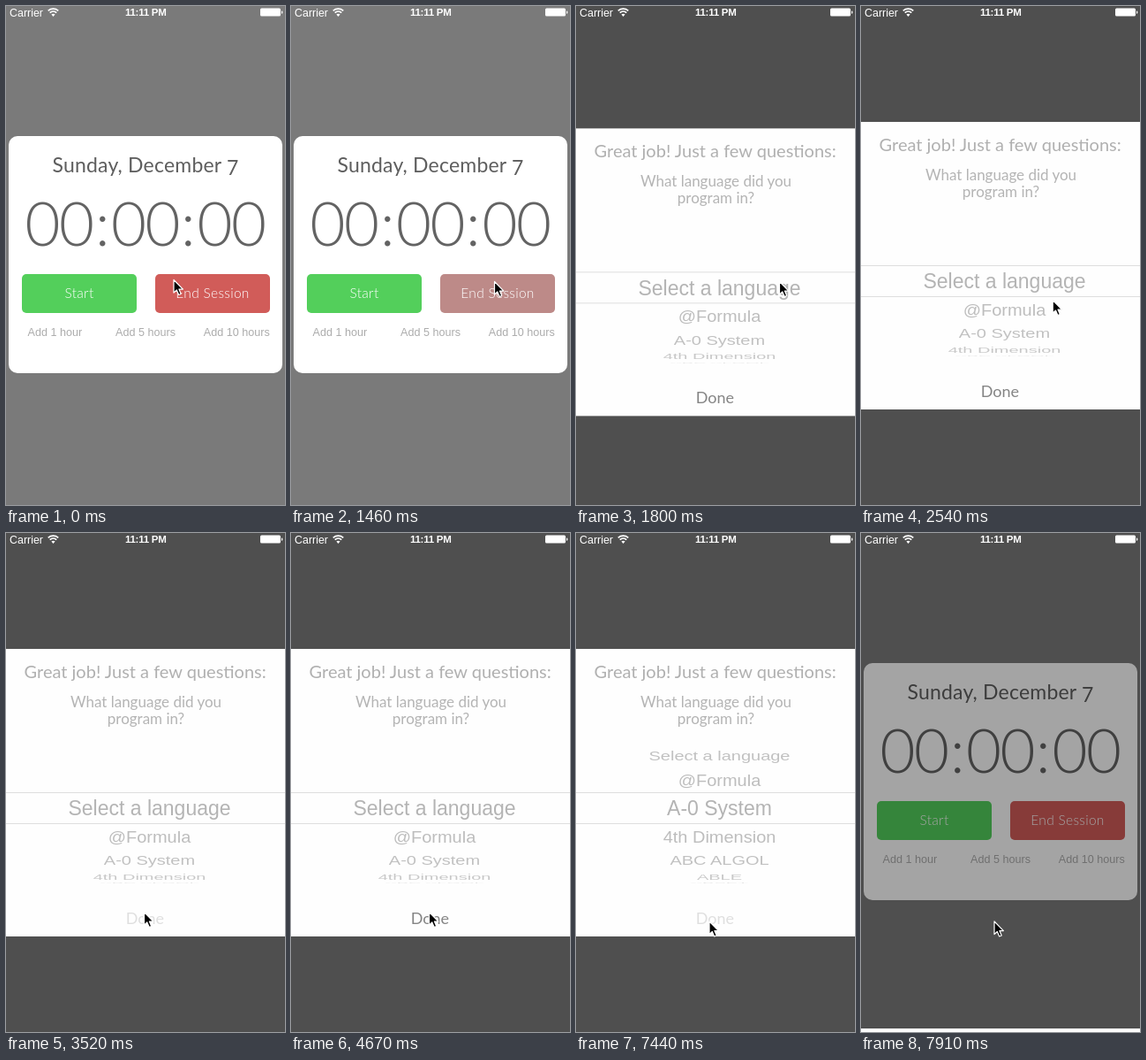
Animation of 316 by 564 pixels, one loop 8 s. Source, as an HTML page:

```html
<!DOCTYPE html>
<html lang="en">
<head>
<meta charset="utf-8">
<title>Session timer</title>
<style>
  html, body { margin: 0; width: 100%; height: 100%; overflow: hidden; background: #7a7a7a; }
  svg { display: block; width: 100vw; height: 100vh; }
  text { text-anchor: middle; font-family: "Liberation Sans", Arial, sans-serif; }
  .soft { font-family: Lato, "Open Sans", sans-serif; }
  .date { font-size: 23px; letter-spacing: .2px; fill: #5e5e5e; }
  .clock { font-size: 69px; font-weight: 300; letter-spacing: -1.5px; fill: #636363; }
  .button { font-size: 15.5px; font-weight: 300; letter-spacing: .3px; fill: #fff; }
  .add { font-size: 12.6px; fill: #acacac; }
  .title { font-size: 20px; fill: #b0b0b0; }
  .ask { font-size: 17px; fill: #b4b4b4; }
  .done { font-size: 18px; fill: #858585; }
  .row { font-size: 20px; }
</style>
</head>
<body>
<svg viewBox="0 0 316 564" preserveAspectRatio="none">
  <defs>
    <clipPath id="band"><rect y="162.5" width="316" height="35"/></clipPath>
    <clipPath id="rest"><path d="M0 70H316V162H0ZM0 198H316V269H0Z"/></clipPath>
    <path id="arrow" d="M0 0V14.6L3.3 11.5L5.7 17L8.2 16L5.9 10.6H10.4Z"
      fill="#000" stroke="#fff" stroke-width="1.2" stroke-linejoin="round"/>
  </defs>

  <rect width="316" height="564" fill="#7a7a7a"/>
  <rect x="3" y="147" width="310" height="268" rx="10" fill="#fff"/>
  <text class="soft date" x="158" y="188">Sunday, December <tspan dy="3">7</tspan></text>
  <text class="soft clock" x="60" y="271">00</text>
  <text class="soft clock" x="108.5" y="271">:</text>
  <text class="soft clock" x="157.5" y="271">00</text>
  <text class="soft clock" x="205.5" y="271">:</text>
  <text class="soft clock" x="255" y="271">00</text>
  <rect x="18" y="303" width="130" height="44" rx="5" fill="#53cf5b"/>
  <rect id="end" x="169" y="303" width="130" height="44" rx="5"/>
  <text class="soft button" x="83" y="330">Start</text>
  <text class="soft button" x="234" y="330">End Session</text>
  <text class="add" x="55.3" y="373">Add 1 hour</text>
  <text class="add" x="158" y="373">Add 5 hours</text>
  <text class="add" x="261.3" y="373">Add 10 hours</text>

  <rect id="shade" width="316" height="564" fill="#000"/>

  <g id="sheet">
    <rect width="316" height="325" fill="#fefefe"/>
    <text class="soft title" x="157.7" y="32.5">Great job! Just a few questions:</text>
    <text class="soft ask" x="158.5" y="66">What language did you</text>
    <text class="soft ask" x="158.5" y="85">program in?</text>
    <path d="M0 162.5H316M0 197.5H316" stroke="#dedede"/>
    <g clip-path="url(#rest)"><g id="wheel" fill="#b9b9b9"></g></g>
    <g clip-path="url(#band)"><g id="lens" fill="#b4b4b4"></g></g>
    <text id="done" class="soft done" x="157.3" y="310.5">Done</text>
  </g>

  <g fill="#fff">
    <text x="23" y="11.5" font-size="12.4">Carrier</text>
    <text x="158.2" y="11" font-size="11.5" font-weight="700" letter-spacing="-.25">11:11 PM</text>
    <path d="M53.5 12L51.4 9.6A3.2 3.2 0 0 1 55.6 9.6Z"/>
    <path d="M49.7 7.6A5.6 5.6 0 0 1 57.3 7.6M47.7 5.4A8.6 8.6 0 0 1 59.3 5.4" fill="none" stroke="#fff" stroke-width="1.6"/>
    <rect x="288" y="2.5" width="23" height="9" rx="1.5"/>
    <path d="M312 5.2A2 2 0 0 1 312 9Z"/>
  </g>

  <g id="ghost">
    <rect x="177" y="342" width="21" height="28"/>
    <use href="#arrow" x="181.5" y="345.5"/>
  </g>
  <use id="cursor" href="#arrow"/>
</svg>

<script>
const LOOP = 8000, LAST = 7910;
const START_Y = 131, TRAVEL = 433;
const STEP = 22 * Math.PI / 180, RADIUS = 85, PITCH = 33;
const LANGS = ["Select a language", "@Formula", "A-0 System", "4th Dimension",
  "ABC ALGOL", "ABLE", "ABSET"];
const PRESSES = [3520, 4300, 5150];
const DRAG = { from: 6200, to: 6500, dx: -1, dy: -71 };
const MOVES = [
  { from: 720, to: 1280, dx: 40.5, dy: 2, lift: 7 },
  { from: 2330, to: 3110, dx: -74, dy: 117 },
  { from: 5540, to: 5930, dx: 24.5, dy: -82.5 },
  DRAG,
  { from: 6790, to: 7140, dx: -29, dy: 164 }
];

const $ = id => document.getElementById(id);

// Eased 0 to 1 between two times
function ramp(t, from, to) {
  const k = Math.max(0, Math.min(1, (t - from) / (to - from)));
  return k * k * (3 - 2 * k);
}

function makeRows(group) {
  return LANGS.map(name => {
    const row = document.createElementNS("http://www.w3.org/2000/svg", "text");
    row.textContent = name;
    row.setAttribute("class", "row");
    row.setAttribute("y", 7.2);
    group.append(row);
    return row;
  });
}

const wheel = makeRows($("wheel")), lens = makeRows($("lens"));

function turn(rows, pos, zoom) {
  rows.forEach((row, i) => {
    const angle = (i - pos) * STEP, depth = Math.cos(angle);
    const shown = Math.abs(angle) < 1.55;
    row.style.display = shown ? "" : "none";
    if (!shown) return;
    const y = 180 + RADIUS * Math.sin(angle) * zoom;
    row.setAttribute("transform", `translate(162.5 ${y}) scale(${zoom} ${zoom * depth})`);
    row.setAttribute("opacity", zoom > 1 ? 1 : .45 + .5 * Math.sqrt(depth));
  });
}

function cursorAt(t) {
  let x = 190, y = 309.5;
  for (const { from, to, dx, dy, lift = 0 } of MOVES) {
    const k = ramp(t, from, to);
    x += dx * k;
    y += dy * k - lift * Math.sin(Math.PI * k);
  }
  return `translate(${x} ${y})`;
}

// The wheel follows the drag past a small threshold, then snaps to a row
function scrollAt(t) {
  const pulled = -DRAG.dy * ramp(t, DRAG.from, DRAG.to) - 8.5;
  const pos = Math.max(0, pulled) / PITCH;
  return pos + (Math.round(pos) - pos) * ramp(t, 6790, 6960);
}

function shakeAt(t) {
  return PRESSES.reduce((dx, p) => {
    const s = t - p - 40;
    return s > 0 && s < 160 ? 3 * Math.sin(s / 25) * (1 - s / 160) : dx;
  }, 0);
}

function dropAt(t) {
  if (t < 1560) return TRAVEL;
  if (t < 2060) return TRAVEL * Math.exp(-.0169 * (t - 1560));
  if (t < 7560) return 0;
  return TRAVEL * (1 - Math.exp(-.0134 * (t - 7560)));
}

function draw(time) {
  const t = Math.min(time, LAST);
  const held = t >= 7440 || PRESSES.some(p => t >= p && t < p + 370);
  const scroll = scrollAt(t);

  $("end").setAttribute("fill", t >= 1460 && t < 2060 ? "#bd8a88" : "#d15c59");
  $("shade").setAttribute("opacity", .355 * ramp(t, 1560, 1760));
  $("sheet").setAttribute("transform", `translate(${shakeAt(t)} ${START_Y + dropAt(t)})`);
  $("done").setAttribute("opacity", held ? .25 : 1);
  turn(wheel, scroll, 1);
  turn(lens, scroll, 1.15);
  $("ghost").style.display = t >= 6270 && t < 6330 ? "" : "none";
  $("cursor").setAttribute("transform", cursorAt(t));
}

const begin = performance.now();
function tick() {
  draw((performance.now() - begin) % LOOP);
  requestAnimationFrame(tick);
}
tick();
</script>
</body>
</html>
```
